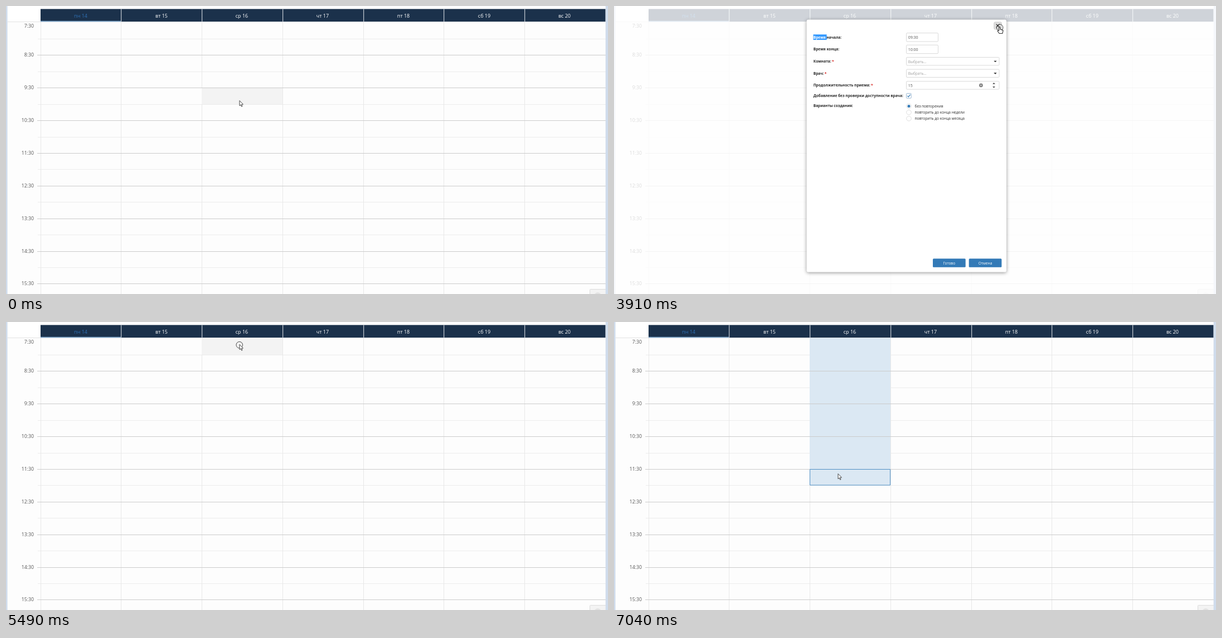
An HTML page with a canvas for the animation above (8000 ms loop, 1080 by 519 pixels).

```html
<!DOCTYPE html>
<html lang="ru">
<head>
<meta charset="utf-8">
<title>Расписание</title>
<style>
  html, body { margin: 0; width: 100%; height: 100%; overflow: hidden; background: #fff; }
  canvas { display: block; width: 1080px; height: 519px; }
</style>
</head>
<body>
<canvas id="stage" width="1080" height="519"></canvas>
<script>
const ctx = document.getElementById('stage').getContext('2d');
const LOOP = 8000, STEP = 140;
const CLICK = 500, OPEN = 1210, OVER_CLOSE = 3370, CLOSE_CLICK = 3770;
const CLOSING = 4180, CLOSED = 4310, DRAG = 5490, RELEASE = 7040;
const DAYS = ['пн', 'вт', 'ср', 'чт', 'пт', 'сб', 'вс'];
const DAY = 2;   // column that is worked in
const FIRST = 4; // half-hour picked by the first click
const BLUE = '#337ab7', INK = '#2a2a2a';
const FONT = '"Open Sans", "Noto Sans", sans-serif';

const START = [418.5, 170];
// each move runs in even steps along a curve bent towards "via"
const MOVES = [
  { start: 1770, steps: 2, ease: 1, via: [440, 168], to: [464, 167.5] },
  { start: 2230, steps: 8, ease: 1, via: [608, 113], to: [697, 37.5] },
  { start: OVER_CLOSE, steps: 1, ease: 1, via: [692, 37], to: [691.8, 37.5] },
  { start: CLOSED, steps: 1, ease: 1, via: [687, 39], to: [687, 39] },
  { start: 4520, steps: 6, ease: 2, via: [432, 131], to: [418.5, 40] },
  { start: 5780, steps: 7, ease: 2, via: [417.5, 156.5], to: [401.5, 273] }
];

const colX = i => Math.floor(62 + 144.75 * i);
const slotY = k => Math.round(29.43 + 29.44 * k);
const slotAt = y => Math.floor((y - 29.43) / 29.44);
const within = (t, a, b) => t >= a && t < b;

function pointer(t) {
  let from = START;
  for (const { start, steps, ease, via, to } of MOVES) {
    if (t < start) break;
    const done = Math.min(1, (Math.floor((t - start) / STEP) + 1) / steps);
    const u = 1 - (1 - done) ** ease;
    from = from.map((a, i) => (1 - u) ** 2 * a + 2 * u * (1 - u) * via[i] + u * u * to[i]);
  }
  return from;
}

// first and last picked half-hour; a drag trails half a step behind the pointer
function picked(t) {
  if (within(t, CLICK + STEP, DRAG)) return [FIRST, FIRST];
  if (t < DRAG + STEP) return null;
  return [0, slotAt((pointer(t)[1] + pointer(t - STEP)[1]) / 2)];
}

function hovered(t, x, y) {
  if (within(t, OPEN, 4520) || t >= 6200) return null;
  if (t >= DRAG) return [DAY, 0];
  return [Math.floor((x - 62) / 144.75), slotAt(y)];
}

function rect(x, y, w, h, color) {
  ctx.fillStyle = color;
  ctx.fillRect(x, y, w, h);
}

function paint(fill, stroke, width = 1) {
  if (fill) { ctx.fillStyle = fill; ctx.fill(); }
  if (stroke) { ctx.strokeStyle = stroke; ctx.lineWidth = width; ctx.stroke(); }
}

function box(x, y, w, h, r, fill, stroke) {
  ctx.beginPath();
  ctx.roundRect(x, y, w, h, r);
  paint(fill, stroke);
}

function disc(x, y, r, fill, stroke) {
  ctx.beginPath();
  ctx.arc(x, y, r, 0, Math.PI * 2);
  paint(fill, stroke);
}

function poly(points, fill, stroke, width) {
  ctx.beginPath();
  points.forEach(([x, y]) => ctx.lineTo(x, y));
  if (fill) ctx.closePath();
  paint(fill, stroke, width);
}

// y is the middle of the capitals; returns the advance
function text(s, x, y, size, color, align = 'left', weight = 400) {
  ctx.font = `${weight} ${size}px ${FONT}`;
  ctx.textAlign = align;
  ctx.fillStyle = color;
  ctx.fillText(s, x, y + size * 0.357);
  return ctx.measureText(s).width;
}

const bold = (s, x, y, color = INK) => text(s, x, y, 6.6, color, 'left', 700);

function cross(x, y, r, color, width) {
  for (const d of [r, -r]) poly([[x - r, y - d], [x + r, y + d]], null, color, width);
}

function fillSlots(col, first, last, color) {
  rect(colX(col), slotY(first), colX(col + 1) - colX(col), slotY(last + 1) - slotY(first), color);
}

function drawHeader() {
  rect(3, 28, 59, 1, '#e2e2e2');
  rect(62, 5.4, 1013.6, 22.8, '#1b314b');
  rect(62, 26.8, 144, 1.4, '#7fa9d0');
  DAYS.forEach((day, i) => {
    if (i) rect(colX(i) + 0.2, 5.4, 1, 22.8, '#e6eaee');
    text(`${day} ${14 + i}`, colX(i + 0.5), 17.3, 9, i ? '#fff' : '#2e70b5', 'center');
  });
}

function drawCalendar(t, x, y) {
  const pick = picked(t), hover = hovered(t, x, y);
  rect(0, 0, 1080, 519, '#fff');
  rect(3, 29, 1073, 490, '#fdfdfd');
  for (let k = 1; k < 17; k += 2) rect(57, slotY(k), 1019, 1, '#ececec');
  DAYS.forEach((_, i) => rect(colX(i), 28, 1, 491, '#e8e8e8'));

  if (hover) fillSlots(hover[0], hover[1], hover[1], '#f3f3f3');
  if (pick) fillSlots(DAY, ...pick, '#dbe8f3');
  if (pick && hover && t >= DRAG) fillSlots(DAY, 0, 0, '#e4e4e4');
  for (let k = 2; k < 17; k += 2) rect(56, slotY(k), 1020, 1, '#cbcbcb');
  if (pick) {
    const top = slotY(pick[1]) + 0.5;
    box(colX(DAY) + 0.5, top, 144, slotY(pick[1] + 1) - top, 0, null, '#4f8fc4');
  }

  for (let h = 0; h < 9; h++)
    text(`${7 + h}:30`, 50, h ? slotY(2 * h) + 0.3 : 36.3, 8.7, '#555', 'right');
  drawHeader();
  box(1047.5, 510.5, 30, 12, 1, '#f3f3f3', '#dcdcdc');
  disc(1061.5, 522, 6, '#e3e3e3');
  rect(0, 0, 2.6, 519, '#cfdcec');
  rect(1075.6, 0, 4.4, 519, '#cfdcec');
}

function field(y, w, h, s, hint) {
  box(524.5, y - h / 2, w, h, 1.5, '#fff', '#d9d9d9');
  text(s, 527.7, y + 0.5, hint ? 6.5 : 7, hint ? '#a0a0a0' : '#555');
}

function triangle(x, y, r, dir) {
  const h = dir * r / 2;
  poly([[x - r, y - h], [x + r, y - h], [x, y + h]], INK);
}

function button(x, s) {
  box(x, 455.3, 58.7, 15.4, 1.5, BLUE);
  text(s, x + 29.3, 463.4, 6.6, '#fff', 'center');
}

function drawForm() {
  const left = 357.7, row = i => 56.5 + 21.6 * i;
  ctx.font = `700 6.6px ${FONT}`;
  const marked = ctx.measureText('Время ').width;
  rect(left - 0.2, row(0) - 5.2, marked + 0.4, 9.8, '#3399ff');
  bold('Время ', left, row(0), '#fff');
  bold('начала:', left + marked, row(0));
  bold('Время конца:', left, row(1));
  ['Комната:', 'Врач:', 'Продолжительность приема:'].forEach((s, i) => {
    const w = bold(s, left, row(i + 2));
    bold('*', left + w + 1.3, row(i + 2), '#d9302c');
  });
  bold('Добавление без проверки доступности врача:', left, 161.5);
  bold('Варианты создания:', left, 180);

  ['09:30', '10:00'].forEach((s, i) => field(row(i) - 0.1, 57, 15.4, s));
  ['Выбрать...', 'Выбрать...', '15'].forEach((s, i) => {
    field(row(i + 2), 166.5, 14.4, s, i < 2);
    if (i < 2) triangle(684, row(i + 2) + 0.3, 2.7, 1);
  });
  for (const dir of [-1, 1]) triangle(681.5, row(4) + 3.5 * dir, 2.3, dir);
  disc(658.4, row(4), 3.4, '#808080');
  cross(658.4, row(4), 1.3, '#fff', 0.8);

  box(524.5, 157.5, 8.7, 8.7, 1, '#fff', '#9db9d3');
  poly([[526.4, 161.9], [528.2, 163.8], [531.6, 159.6]], null, BLUE, 1.2);
  ['без повторения', 'повторить до конца недели', 'повторить до конца месяца'].forEach((s, i) => {
    const y = 180.4 + 11.2 * i;
    disc(529, y, 4.3, '#fff', '#dedede');
    if (!i) disc(529, y, 2.5, BLUE);
    text(s, 539.5, y + 0.3, 6.6, INK);
  });
}

function drawDialog(t) {
  ctx.save();
  if (t >= CLOSING) {
    ctx.translate(525, 252);
    ctx.scale(0.985, 0.985);
    ctx.translate(-525, -252);
  }
  ctx.save();
  ctx.shadowColor = 'rgba(0,0,0,.42)';
  ctx.shadowBlur = 6;
  ctx.shadowOffsetY = 1.2;
  box(345.6, 24.5, 358.4, 455, 3, '#fff');
  ctx.restore();

  if (t >= CLOSING) ctx.globalAlpha = 0.95;
  if (t >= OVER_CLOSE) box(681.8, 29, 13.5, 13, 2, '#dedede', '#cdcdcd');
  cross(688.6, 35.6, 3, '#2b2b2b', 1.25);
  drawForm();
  button(572, 'Готово');
  button(636.7, 'Отмена');
  ctx.restore();
}

function drawArrow() {
  ctx.translate(0.5, 0.5);
  poly([[0, 0], [0, 9.3], [2.1, 7.4], [3.6, 10.8], [5, 10.2], [3.6, 6.9], [6.4, 6.7]], '#fff');
  ctx.closePath();
  paint(null, '#333', 0.9);
}

function drawHand() {
  ctx.beginPath();
  ctx.moveTo(-1.2, 7.2);
  ctx.lineTo(-1.2, 1);
  ctx.quadraticCurveTo(0, -0.8, 1.1, 1);
  ctx.lineTo(1.1, 4.4);
  for (let i = 1; i < 4; i++) ctx.quadraticCurveTo(1.8 * i, 3.2 + 0.6 * i, 1.1 + 1.75 * i, 4.6 + 0.7 * i);
  ctx.lineTo(5.1, 12);
  ctx.lineTo(-0.6, 12);
  ctx.lineTo(-3.6, 7.8);
  ctx.quadraticCurveTo(-3.4, 5.6, -1.2, 7.2);
  paint('#fff', '#333', 1.1);
}

function draw(t) {
  const [x, y] = pointer(t);
  drawCalendar(t, x, y);
  if (within(t, OPEN, CLOSING)) rect(0, 0, 1080, 519, 'rgba(255,255,255,.79)');
  if (within(t, OPEN, CLOSED)) drawDialog(t);

  const pressed = within(t, CLICK, CLICK + 2 * STEP) ||
    within(t, CLOSE_CLICK, CLOSE_CLICK + 2 * STEP) || within(t, DRAG, RELEASE);
  if (pressed) disc(x + 0.3, y + 1.3, 5.8, null, '#444');
  ctx.save();
  ctx.translate(x, y);
  (within(t, OVER_CLOSE, CLOSED) ? drawHand : drawArrow)();
  ctx.restore();
}

function tick() {
  draw(performance.now() % LOOP);
  requestAnimationFrame(tick);
}
tick();
</script>
</body>
</html>
```
